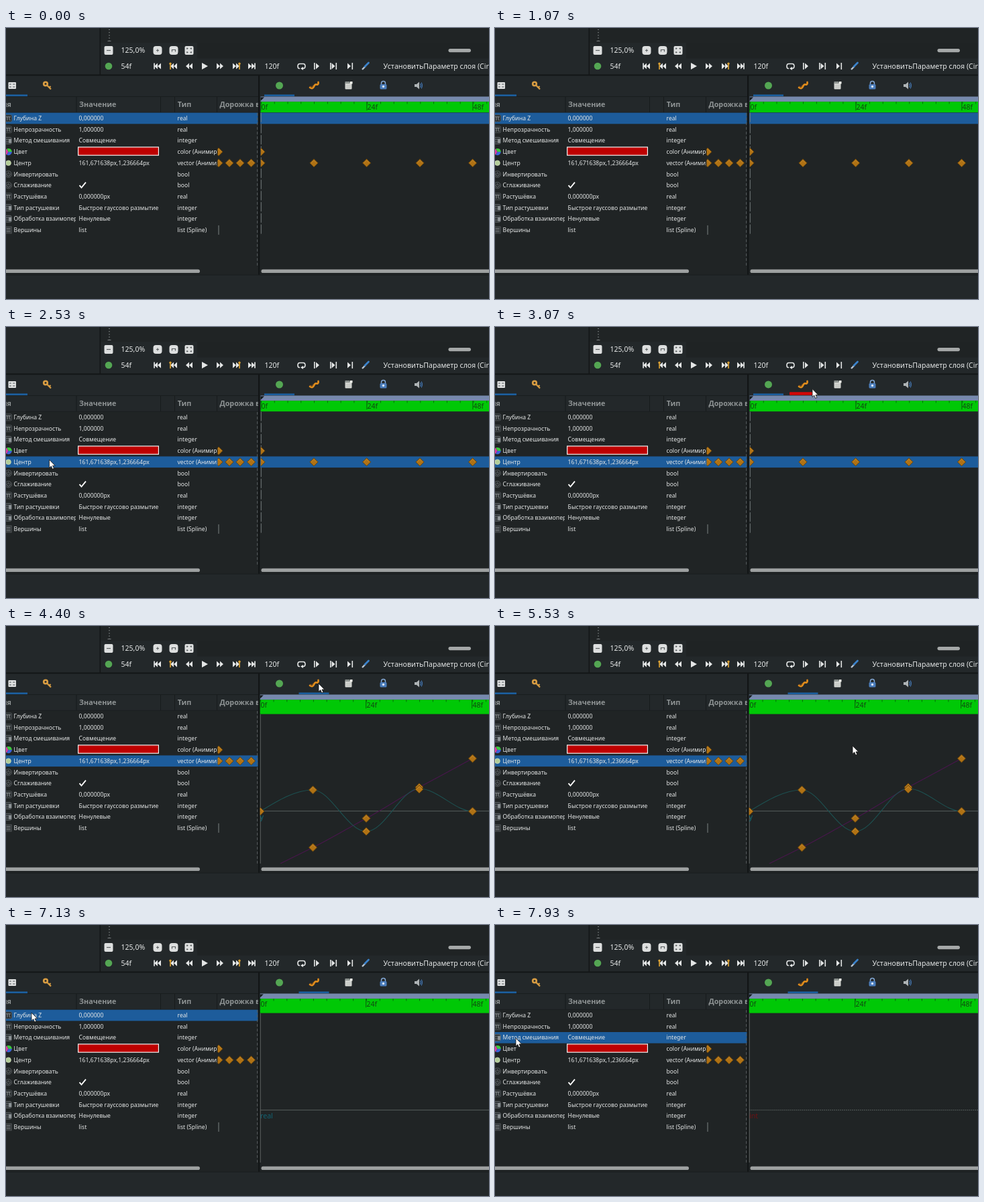
Animation of 720 by 405 pixels, one loop 8 s. Source, as an HTML page:

```html
<!DOCTYPE html>
<html lang="ru">
<head>
<meta charset="utf-8">
<style>
html, body { margin: 0; width: 100%; height: 100%; overflow: hidden; background: #23282a; }
svg { display: block; width: 720px; height: 405px; font-family: "Noto Sans", "Open Sans", sans-serif; white-space: pre; }
</style>
</head>
<body>
<svg id="stage" viewBox="0 0 720 405"></svg>
<script>
const LOOP = 8000, PITCH = 16.7, TOP = 126.6;
const PANEL = '#23282a', FIELD = '#202425', BLUE = '#1d5c9b';
const rowY = i => TOP + PITCH * (i + 0.5);

const rect = (x, y, w, h, fill, more = '') =>
  `<rect x="${x}" y="${y}" width="${w}" height="${h}" fill="${fill}" ${more}/>`;
const text = (x, y, size, str, fill = '#e6e8e8', more = '') =>
  `<text x="${x}" y="${y}" font-size="${size}" fill="${fill}" ${more}>${str}</text>`;
const shape = (d, fill = '#e4e6e6', more = '') => `<path d="${d}" fill="${fill}" ${more}/>`;
const line = (d, stroke, width = 1, more = '') =>
  `<path d="${d}" fill="none" stroke="${stroke}" stroke-width="${width}" ${more}/>`;
const dot = (x, y, r, fill, more = '') => `<circle cx="${x}" cy="${y}" r="${r}" fill="${fill}" ${more}/>`;
const at = (x, y, body) => `<g transform="translate(${x} ${y})">${body}</g>`;
const clip = (id, body) => `<g clip-path="url(#${id})">${body}</g>`;
const heading = (x, str, more = '') => text(x, 118, 10.8, str, '#8f9495', `font-weight="700" ${more}`);
const diamond = (x, y) =>
  shape(`M${x} ${y - 6.1}l6.1 6.1l-6.1 6.1l-6.1-6.1z`, '#b07214', 'stroke="#5f400c" stroke-width=".9"') +
  line(`M${x - 4} ${y}l4-4l4 4`, '#c48a30', 0.8);

const rows = [
  ['Глубина Z', '0,000000', 'real', 'pi'],
  ['Непрозрачность', '1,000000', 'real', 'pi'],
  ['Метод смешивания', 'Совмещение', 'integer', 'stack'],
  ['Цвет', '', 'color (Анимировано)', 'wheel'],
  ['Центр', '161,671638px,1,236664px', 'vector (Анимировано)', 'point'],
  ['Инвертировать', '', 'bool', 'ring'],
  ['Сглаживание', '', 'bool', 'ring'],
  ['Растушёвка', '0,000000px', 'real', 'pi'],
  ['Тип растушевки', 'Быстрое гауссово размытие', 'integer', 'stack'],
  ['Обработка взаимопересечений', 'Ненулевые', 'integer', 'stack'],
  ['Вершины', 'list', 'list (Spline)', 'list']
];

const icons = {
  pi: rect(-5, -5, 10, 10, '#2a2f31', 'rx="2" stroke="#565b5d" stroke-width=".8"') +
    line('M-3.5-2.2H3.5M-1.5-2V3M1.5-2V2Q1.7 3 3 2.6', '#8c9193', 1),
  stack: rect(-4.5, -5, 9, 10, '#34393c', 'rx="2" stroke="#6a7073" stroke-width=".8"') +
    line('M-4-1.7H4M-4 1.7H4', '#767c7f', 0.8) + rect(0.5, -2.5, 4, 6, '#8d9396'),
  wheel: shape('M0 0L-2.5 4.5A5.2 5.2 0 0 1-2.5-4.5z', '#d63ca0') + shape('M0 0L-2.5-4.5A5.2 5.2 0 0 1 5.2 0z', '#3cc83c') +
    shape('M0 0L5.2 0A5.2 5.2 0 0 1-2.5 4.5z', '#3a63d6'),
  point: dot(0, 0, 3.8, '#b3cd98', 'stroke="#cfdcbd" stroke-width=".8"'),
  ring: dot(0, 0, 4.8, '#292d2f', 'stroke="#565b5d"') + line('M0-3V0M-2-1.5A2.6 2.6 0 1 0 2-1.5', '#6d7274', 0.9),
  list: rect(-4.5, -5, 9, 10, '#2b2f31', 'stroke="#5d6264" stroke-width=".8"') +
    line('M-3-2.5H3M-3 0H3M-3 2.5H3', '#8c9193', 0.9)
};

const table = () => rows.map(([name, value, type, icon], i) => {
  const y = rowY(i), base = y + 3.1;
  return at(3.6, y, icons[icon]) +
    clip('nameCol', text(11.6, base, 8.62, name)) +
    text(108.6, base, 8.65, value) +
    clip('typeCol', text(255.5, base, 8.62, type));
}).join('') +
  rect(107.6, 178, 119.8, 12.2, '#be0000', 'stroke="#f2f2f2" stroke-width="1.2"') +
  line(`M109.5 ${rowY(6)}l3 3.5l6.5-8`, '#fff', 1.8) +
  clip('trackCol', diamond(317, rowY(3)) + [317, 333, 349, 365.5].map(x => diamond(x, rowY(4))).join('')) +
  line(`M317 ${rowY(10) - 7}v14`, '#7d8384');

// Toolbar buttons and playback controls
const button = (x, mark, rx = 2) => rect(x - 6.5, 27, 13, 13, '#dddfdf', `rx="${rx}"`) + at(x, 33.5, line(mark, '#5b6062', 1.2));
const skip = (x, dir) => `<g transform="translate(${x} 57) scale(${dir} 1)">` +
  shape('M-5-4.5L0 0L-5 4.5zM0-4.5L5 0L0 4.5z') + '</g>';
const jump = (x, dir) => skip(x, dir) + rect(x + dir * 5 - 0.8, 52.5, 1.7, 9, '#e4e6e6');
const keyJump = (x, dir) => skip(x, dir) + rect(x + dir * 5 - 0.8, 54, 1.7, 8, '#d9a034') +
  dot(x + dir * 5, 53.2, 1.7, '#d9a034');

const toolbar = () =>
  button(153, 'M-3 0H3') + button(226, 'M-2 0H2M0-2V2', 4) + button(250, 'M-2.5 2V-1H2.5V2', 4) +
  button(273, 'M-4-3H-1.5M1.5-3H4M-4 3H-1.5M1.5 3H4M-3-4V-1.5M3-4V-1.5M-3 1.5V4M3 1.5V4') +
  text(171.6, 37.4, 10.5, '125,0%') + text(171.6, 60.8, 10.5, '54f') + text(385.6, 60.8, 10.5, '120f') +
  text(562.4, 60.8, 10.6, 'УстановитьПараметр слоя (Circle)') +
  dot(153, 57, 5.3, '#54a653') +
  jump(226, -1) + keyJump(250, -1) + skip(273, -1) + shape('M292 52L301 57L292 62z') +
  skip(319, 1) + keyJump(343, 1) + jump(366, 1) +
  line('M438 60.5H437Q435 60.5 435 57T438 53.5H443Q446 53.5 446 57T443 60.5H441', '#e4e6e6', 1.6) +
  shape('M443 58l-4 2.5l4 2.5z') +
  shape('M459 52h1.6v10H459zM462 52.5l5 4.5l-5 4.5z') +
  shape('M483 52h1.6v10H483zM485.5 52.5l5 4.5l-5 4.5zM491.5 52h1.6v10h-1.6z') +
  shape('M509 52.5l5 4.5l-5 4.5zM515.5 52h1.6v10h-1.6z') +
  line('M531 62L536 57', '#b9c6d4', 2.4) + line('M535 57.5L540.5 52', '#3b82ca', 2.8, 'stroke-linecap="round"');

const tabs = () =>
  rect(3.5, 81, 11.5, 10, '#e0e2e2', 'rx="1"') + line('M5 84H8M10 84H13.5M5 88H8M10 88H13.5', '#50565a', 1.2) +
  dot(59, 83.5, 2.8, 'none', 'stroke="#d99d42" stroke-width="2.6"') + line('M61 85.5L67 91.5M64.5 89l2-2', '#d99d42', 2.2) +
  dot(407.5, 86, 5.5, '#54a653') +
  line('M453 89C456 91 458 90 459 87.5S461 84 463 84.5S466 83 465.5 81', '#e08c1c', 2.7, 'stroke-linecap="round"') +
  line('M453 87C456 89 457 87 458 85.5', '#a85d12', 0.9) +
  rect(505.5, 81.5, 10, 10, '#d3d5d1', 'rx="1"') + rect(505.5, 80, 7, 3, '#8e9491') + rect(513, 80, 3.5, 3.5, '#f3f4ee') +
  line('M507 86H514M507 88.5H514', '#b9bdb8', 0.8) +
  rect(557.5, 84, 10, 7.5, '#4b7dbb', 'rx="1.5"') + line('M559.5 84V82.5A3 3 0 0 1 565.5 82.5V84', '#84a8d6', 1.5) +
  dot(562.5, 87.5, 1.7, '#dce8f5') +
  shape('M609 84h3l4-3.5v11L612 88h-3z', '#aeb3b5') + line('M617.5 83Q619.5 86 617.5 89M619 81.5Q622 86 619 90.5', '#4579b7', 1.1);

const ruler = () => {
  let s = rect(379.5, 102.5, 345, 7.8, '#7689ad') + rect(379.5, 110.2, 345, 21.4, '#00c806', 'id="band"');
  for (let i = 0; i < 18; i++) s += rect(380 + i * 19.78, 110.2, 0.9, 3.2, '#08620c');
  ['0f', '24f', '48f'].forEach((label, i) => {
    s += rect(379.4 + i * 158, 110.2, 1, 13, '#075d0a') + text(380.6 + i * 158, 122, 10.5, label, '#114812');
  });
  return s + shape('M379.5 103.5h5.5l-5.5 5.5z', '#15191a');
};

const curves = () =>
  line('M404 357.5L457.5 331C485 317 510 302 537 287.5S590 255 616 241S670 212 695.5 198', '#48164c', 1.1) +
  line('M379 277C405 261 431 245 457.5 245C484 245 509 307 537 307S589 243 616 243S670 277 695.5 277', '#1c5151', 1.1) +
  [[379, 277], [457.5, 331], [457.5, 245], [537, 287.5], [537, 307], [616, 241], [616, 244], [695.5, 198], [695.5, 277]]
    .map(p => diamond(...p)).join('') + text(378.5, 289, 10.8, 'y', '#146c76');

const stage = document.getElementById('stage');
stage.innerHTML = `<defs>
  <clipPath id="nameCol"><rect y="120" width="104" height="240"/></clipPath>
  <clipPath id="typeCol"><rect y="120" width="314.5" height="240"/></clipPath>
  <clipPath id="trackCol"><rect x="315.5" y="100" width="60.5" height="256"/></clipPath>
  <clipPath id="pane"><rect x="378.5" y="100" width="342" height="255"/></clipPath>
  <clipPath id="keys"><rect x="379.8" y="120" width="341" height="235"/></clipPath>
</defs>` +
  rect(0, 0, 720, 405, PANEL) +
  rect(141, 0, 579, 22, FIELD) + rect(285, 22, 435, 23.5, '#1f2324') +
  rect(139.5, 0, 1.6, 70, '#141718') +
  line('M154 2V19', '#777c7e', 2, 'stroke-dasharray="1 3.2"') + line('M151.5 19.5H156.5', '#777c7e') +
  rect(659.5, 31, 33.5, 5.2, '#a5a8a8', 'rx="2.6"') +
  rect(0, 69.4, 720, 2, '#131617') +
  rect(0, 126.5, 720, 242.5, FIELD) +
  line('M0 102.5H376M0 126.3H376', '#191d1e') +
  line('M105 103V126M230.5 103V126M251.5 103V126M314.5 103V126', '#171b1c') +
  toolbar() + tabs() +
  rect(0, 99.4, 32, 2.7, '#1c5f9f') +
  rect(0, 99.4, 45, 2.7, '#1c5f9f', 'id="tabLine"') +
  heading(8, 'Имя', 'text-anchor="end"') + heading(109, 'Значение') + heading(255.8, 'Тип') +
  clip('trackCol', heading(318.4, 'Дорожка времени')) +
  rect(0, 0, 375.5, PITCH, BLUE, 'id="selected"') +
  table() +
  clip('pane', `<g id="ruler">${ruler()}</g>`) +
  `<g id="track">${rect(379, 0, 341, PITCH, BLUE, 'id="trackSelected"')}` +
  line(`M380.3 ${TOP}V309`, '#747a7b', 1, 'stroke-dasharray="14 2.7"') +
  clip('keys', diamond(380, rowY(3)) + [380, 459, 537.6, 617, 695.6].map(x => diamond(x, rowY(4))).join('')) + '</g>' +
  `<g id="graph" clip-path="url(#pane)">` +
  line('M379 132V355', '#777d7d') + line('M379 276.6H720', '#565d5c', 1, 'id="axis"') +
  `<g id="curves">${curves()}</g>` +
  text(379, 289, 10.6, 'real', '#126272', 'id="kind"') + '</g>' +
  line('M374.7 127V355', '#565c5e', 1, 'stroke-dasharray="4 3"') +
  rect(376, 71, 2.2, 298, '#121516') +
  rect(-5, 360.8, 294, 5.2, '#9da0a0', 'rx="2.6"') + rect(380.5, 360.8, 350, 5.2, '#9da0a0', 'rx="2.6"') +
  rect(0, 368.6, 720, 1, '#1a1d1e') +
  rect(439, 97.2, 0, 4.6, '#d30808', 'id="mark" rx="1"') +
  shape('M0 0V12.2L2.8 9.6L4.7 14L6.9 13L5 8.9H8.7z', '#fff', 'id="cursor" stroke="#151515" stroke-width=".8"');

const el = id => document.getElementById(id);
const set = (id, attrs) => { for (const k in attrs) el(id).setAttribute(k, attrs[k]); };
const show = (id, on) => set(id, { visibility: on ? 'visible' : 'hidden' });

// Pointer stops: time, x, y
const path = [
  [1470, 147, 259], [1530, 53, 196], [1670, 53, 201.5], [2500, 53, 201.5],
  [2800, 440, 95], [3050, 473, 92.5], [3550, 473, 92.5], [3750, 466, 86],
  [4800, 466, 86], [5200, 529, 172], [5400, 529, 172], [5530, 533, 179],
  [6000, 533, 179], [6720, 38, 131], [7300, 38, 131], [7600, 31, 169], [8000, 31, 169]
];

function pointer(t) {
  const i = path.findIndex(p => p[0] > t);
  if (i < 1) return null;
  const [t0, x0, y0] = path[i - 1], [t1, x1, y1] = path[i];
  const u = (t - t0) / (t1 - t0), e = u * u * (3 - 2 * u);
  return [x0 + (x1 - x0) * e, y0 + (y1 - y0) * e];
}

function draw(t) {
  const graphOn = t >= 3800;
  const row = t < 1670 ? 0 : t < 6800 ? 4 : t < 7670 ? 0 : 2;
  const y = TOP + row * PITCH;
  set('selected', { y });
  set('trackSelected', { y });
  set('tabLine', { x: graphOn ? 436.5 : 385 });
  set('ruler', { transform: `translate(${graphOn ? -1.2 : 0} 0)` });
  set('band', { height: graphOn ? 21.4 : 16 });
  show('track', !graphOn);
  show('graph', graphOn);
  show('curves', graphOn && row === 4);
  show('kind', graphOn && row !== 4);
  el('kind').textContent = row === 2 ? 'int' : 'real';
  set('kind', { fill: row === 2 ? '#6b1214' : '#126272' });
  set('axis', { 'stroke-dasharray': row === 2 ? '2 1' : 'none' });

  const grow = Math.min(1, Math.max(0, (t - 2800) / 250));
  set('mark', { width: 37 * grow });
  show('mark', t >= 2800 && t < 3400);

  const p = pointer(t);
  show('cursor', p);
  if (p) set('cursor', { transform: `translate(${p[0]} ${p[1]})` });
}

const start = performance.now();
function tick() {
  draw((performance.now() - start) % LOOP);
  requestAnimationFrame(tick);
}
tick();
</script>
</body>
</html>
```
